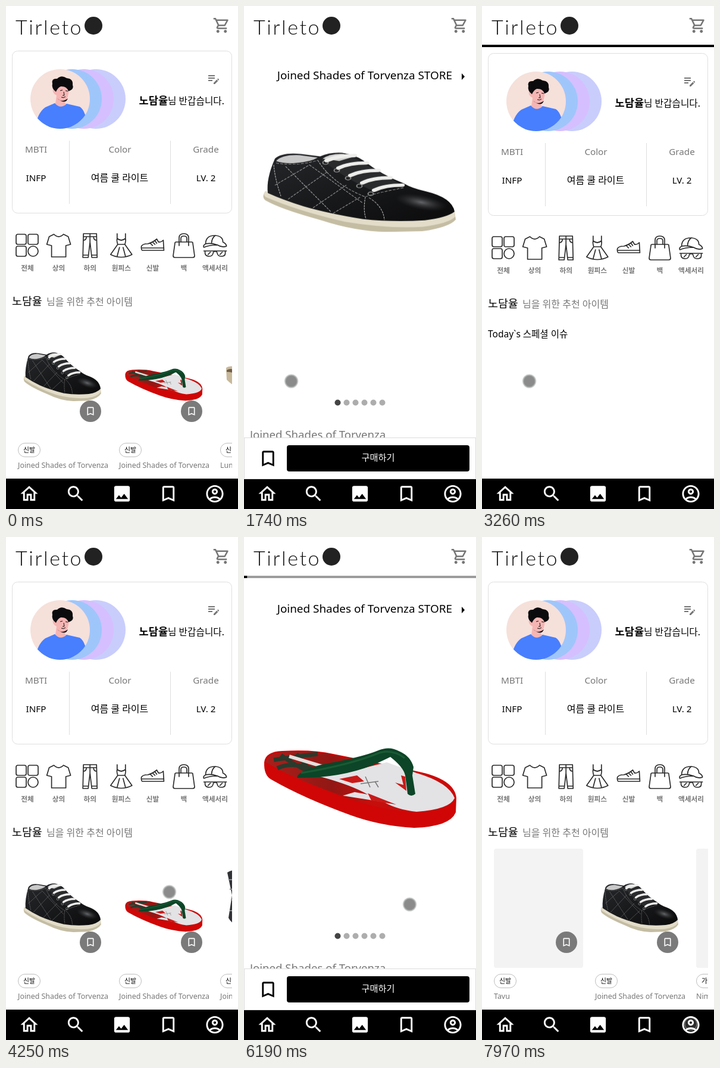
Animation, 390 px wide and 844 px high, one loop 8 s. Source, as an HTML page:

```html
<!DOCTYPE html>
<html lang="ko">
<head>
<meta charset="utf-8">
<title>Shop walkthrough</title>
<style>
html, body { margin: 0; width: 100%; height: 100%; overflow: hidden; background: #fff; }
svg { display: block; width: 390px; height: 844px; }
text { font-family: 'Noto Sans', 'Noto Sans CJK KR', 'Noto Sans CJK JP', 'Noto Sans CJK', sans-serif; }
.mid { text-anchor: middle; }
.gray { fill: #777; }
.line { fill: none; stroke: #2b2b2b; stroke-width: 1.7; stroke-linejoin: round; stroke-linecap: round; }

.shift, .bar, .page, .list, .shoe, .sandal { animation: 8s step-end infinite; }
.shift { animation-name: shift; }
.bar { animation-name: bar; }
.page { animation-name: page; }
.first { animation-name: first; }
.second { animation-name: second; }
.third { animation-name: third; }
.shoe { animation-name: early; }
.sandal { animation-name: late; }
.fill { animation: fill 8s linear infinite; }
.grow { transform-origin: 0 177px; animation: grow 8s cubic-bezier(.33, 1, .68, 1) infinite; }
.dot { animation: move 8s ease-in-out infinite; }

@keyframes shift {
  0%, 21.75%, 48.25%, 63%, 85.5%, 100% { transform: translateY(0); }
  15.1%, 32.3%, 58.95%, 77.3% { transform: translateY(4px); }
}
@keyframes bar {
  0%, 21.75%, 48.25%, 63%, 85.5%, 100% { visibility: hidden; }
  15.1%, 32.3%, 58.95%, 77.3% { visibility: visible; }
}
@keyframes fill {
  0%, 15.1% { transform: scaleX(0); }
  21.74% { transform: scaleX(1); }
  21.75%, 32.375% { transform: scaleX(0); }
  39%, 48.25% { transform: scaleX(1); }
  48.26%, 58.95% { transform: scaleX(0); }
  62.99% { transform: scaleX(.61); }
  63%, 77.3% { transform: scaleX(0); }
  83.9%, 100% { transform: scaleX(1); }
}
@keyframes page {
  0%, 36.875%, 81.25%, 100% { visibility: hidden; }
  21.75%, 63% { visibility: visible; }
}
@keyframes first { 0% { visibility: visible; } 15.1%, 100% { visibility: hidden; } }
@keyframes second { 0%, 58.95%, 100% { visibility: hidden; } 48.25% { visibility: visible; } }
@keyframes third { 0% { visibility: hidden; } 85.5%, 100% { visibility: visible; } }
@keyframes early { 0% { opacity: 1; } 50%, 100% { opacity: 0; } }
@keyframes late { 0% { opacity: 0; } 50%, 100% { opacity: 1; } }
@keyframes grow {
  0%, 21.75% { transform: scaleY(.65); }
  25%, 62.99% { transform: scaleY(1); }
  63% { transform: scaleY(.65); }
  66.5%, 100% { transform: scaleY(1); }
}
@keyframes move {
  0%, 5.8% { transform: translate(184px, 726px); opacity: 0; }
  5.87% { transform: translate(184px, 726px); opacity: 1; }
  12.6%, 48.25% { transform: translate(79.5px, 629.5px); }
  53.1% { transform: translate(274.5px, 595.5px); }
  58.1%, 88% { transform: translate(278.5px, 616.5px); }
  97% { opacity: 1; }
  98%, 100% { transform: translate(351px, 817px); opacity: .7; }
}
</style>
</head>
<body>
<svg viewBox="0 0 390 844" xmlns="http://www.w3.org/2000/svg">
<defs>
  <path id="mark" d="M17 3H7c-1.1 0-1.99.9-1.99 2L5 21l7-3 7 3V5c0-1.1-.9-2-2-2zm0 15-5-2.18L7 18V5h10v13z"/>
  <clipPath id="face"><circle cx="91" cy="156" r="50"/></clipPath>
  <clipPath id="row"><rect x="10" y="515" width="370" height="285"/></clipPath>
  <linearGradient id="leather" x1="0" y1="0" x2="1" y2="1">
    <stop offset="0" stop-color="#26272a"/><stop offset=".5" stop-color="#18191b"/><stop offset="1" stop-color="#0b0b0c"/>
  </linearGradient>
  <radialGradient id="sheen">
    <stop offset="0" stop-color="#777a7e" stop-opacity=".8"/><stop offset="1" stop-color="#333" stop-opacity="0"/>
  </radialGradient>
  <linearGradient id="bed">
    <stop offset="0" stop-color="#a8201c"/><stop offset=".35" stop-color="#921714"/><stop offset=".55" stop-color="#c50f0d"/>
  </linearGradient>

  <g id="shoe">
    <path fill="#c4bda3" d="M36 381Q29 396 36 405Q62 428 130 456Q186 484 240 486L300 484Q345 474 356 454L354 434Q300 462 230 458Q140 440 36 381Z"/>
    <path fill="#e2dcc8" d="M36 381Q31 390 36 396Q90 432 170 460Q240 478 300 473Q345 464 355 447L354 434Q300 460 230 456Q140 436 36 381Z"/>
    <path fill="url(#leather)" d="M52 298Q64 281 96 286L128 292Q145 281 165 283Q186 288 200 302Q232 340 268 361Q282 374 306 382Q350 398 354 434Q340 450 304 456Q250 461 200 453Q140 438 100 420Q66 404 40 386Q37 350 52 298Z"/>
    <ellipse cx="298" cy="410" rx="46" ry="19" transform="rotate(18 298 410)" fill="url(#sheen)"/>
    <ellipse cx="205" cy="350" rx="16" ry="50" transform="rotate(-35 170 350)" fill="url(#sheen)" opacity=".35"/>
    <path fill="#c9c9c9" d="M54 304Q64 287 94 289L124 295Q112 306 88 309Q68 312 54 304Z"/>
    <g fill="none" stroke="#b9b9b9" stroke-width="1.1" stroke-dasharray="5 2">
      <path d="M54 309Q90 318 124 302M50 314Q52 350 62 394M124 302Q148 362 204 396Q216 388 270 372M204 396Q200 430 205 452M210 398Q234 420 236 455M70 318L146 434M110 314L200 412M52 366L110 314M74 402L140 332M116 424L172 366M150 438L196 396"/>
    </g>
    <path fill="#2a2b2d" d="M130 300Q150 284 178 290L262 362L222 384Q170 350 130 300Z"/>
    <g id="eyes" fill="none" stroke="#8f8f8f" stroke-width="2"></g>
    <path fill="#d4d4d2" d="M132 298Q146 284 168 286L182 294L160 304Z"/>
    <g id="laces" fill="none" stroke="#eeeeec" stroke-width="8.500" stroke-linecap="round"></g>
  </g>

  <g id="sandal">
    <path fill="#cf0605" d="M34 374Q36 356 64 355Q116 352 150 360L230 376L290 389Q354 402 357 434L356 458Q346 482 286 484Q230 481 180 463Q100 434 46 403Q33 396 34 374Z"/>
    <path fill="url(#bed)" d="M37 374Q40 357 70 357Q120 354 150 362L290 391Q348 404 355 434Q342 458 286 458Q214 452 150 425Q80 400 37 374Z"/>
    <path fill="none" stroke="#2b3a2c" stroke-width="7" d="M50 370Q90 364 124 360M56 384Q80 372 118 386M88 360L108 384M62 362Q84 378 106 388"/>
    <path stroke="#e6dedb" stroke-width="6" d="M76 364L142 384"/>
    <path fill="#e3e2e5" d="M128 398L176 390L240 374L290 392Q344 408 354 434Q346 453 290 457Q256 453 236 441L166 430L186 424L208 428Q180 412 128 398Z"/>
    <path fill="#c91a18" d="M160 402L190 396L202 406L182 409ZM208 426L256 445L214 438ZM264 396L271 398L273 422L254 408L268 412Z"/>
    <path fill="none" stroke="#777" stroke-width="1.500" d="M196 410L226 406M204 398L212 416M220 406L226 416"/>
    <path fill="#0c4527" d="M89 400Q90 389 130 378Q200 365 226 354Q245 346 262 356Q280 364 285 382L283 396L288 427Q281 433 275 427L271 396Q268 382 246 365Q236 370 216 379Q160 401 89 400Z"/>
    <path fill="none" stroke="#1a5a34" stroke-width="3" d="M96 392Q180 378 228 358Q250 352 270 367"/>
  </g>
  <g id="boot"><path fill="#303236" d="M12 40Q20 34 40 36V135Q20 128 14 116L20 78Z"/><path stroke="#888" stroke-width="2" d="M14 52H40M16 68H40M18 86H40M16 104H40"/></g>
  <g id="beige"><path fill="#c8b89b" d="M10 84Q17 78 35 86V120Q18 112 11 104Z"/><path fill="#715e48" d="M11 88Q20 82 35 94V99Q20 90 11 91Z"/></g>
  <rect id="blank" width="150" height="200" rx="4" fill="#f3f3f3"/>
</defs>

<rect width="390" height="844" fill="#fff"/>

<g class="shift">
  <rect x="10.5" y="75.5" width="369" height="272" rx="9" fill="#fff" stroke="#dedede"/>
  <circle cx="151" cy="156" r="50" fill="#c9cdfc"/>
  <circle cx="131" cy="156" r="50" fill="#d5bfff"/>
  <circle cx="111" cy="156" r="50" fill="#9fc6fb"/>
  <g clip-path="url(#face)">
    <rect x="41" y="106" width="100" height="100" fill="#f6e0da"/>
    <path fill="#477fff" d="M49 206Q52 180 66 170L82 163Q92 170 102 164L124 169Q135 176 137 206Z"/>
    <path fill="#f5b5b3" d="M82 130L106 134Q106 156 98 160L101 165Q91 173 83 164L85 150Q77 146 79 139Z"/>
    <path fill="#0b0b0d" d="M84 144Q76 138 78 130Q76 121 86 122Q93 115 102 121Q113 122 112 132Q115 140 105 143Q102 134 92 135Q87 137 84 144ZM86 155Q94 163 104 155Q100 166 86 155Z"/>
    <path fill="none" stroke="#111" d="M91 142l4-1M100 142l4 1M97 144l1 6l-3 0M93 153q4 2 7-1"/>
  </g>
  <path transform="translate(337 110)" fill="#757575" d="M3 10h11v2H3v-2zm0-2h11V6H3v2zm0 8h7v-2H3v2zm15.01-3.13.71-.71c.39-.39 1.02-.39 1.41 0l.71.71c.39.39.39 1.02 0 1.41l-.71.71-2.12-2.12zm-.71.71-5.3 5.3V21h2.12l5.3-5.3-2.12-2.12z"/>
  <text x="367" y="165" text-anchor="end" font-size="15.7"><tspan font-size="17.6" font-weight="700">노담율</tspan>님 반갑습니다.</text>
  <g class="mid" font-size="15.2">
    <g class="gray"><text x="50.5" y="246">MBTI</text><text x="191.5" y="246">Color</text><text x="336" y="246">Grade</text></g>
    <text x="50.5" y="294">INFP</text><text x="191" y="294" font-size="16">여름 쿨 라이트</text><text x="336" y="294">LV. 2</text>
  </g>
  <path d="M106.5 226V332M276.5 226V332" stroke="#dedede"/>
  <g id="cats"></g>
  <text x="10" y="502" font-size="18.4" font-weight="500">노담율</text>
  <text x="68" y="502" font-size="16" class="gray">님을 위한 추천 아이템</text>
  <text x="10" y="552" font-size="15.5">Today`s 스페셜 이슈</text>
  <g id="lists" clip-path="url(#row)"></g>
</g>

<g class="page">
  <rect y="65" width="390" height="729" fill="#fff"/>
  <g class="shift">
    <text x="350" y="123" text-anchor="end" font-size="18.9">Joined Shades of Torvenza STORE</text>
    <path d="M366 113L371 118.500L366 124Z"/>
    <g class="grow">
      <use href="#shoe" class="shoe"/>
      <use href="#sandal" class="sandal"/>
    </g>
    <g id="pager"></g>
    <text x="10" y="726" font-size="18.6" class="gray">Joined Shades of Torvenza</text>
  </g>
</g>

<rect y="793" width="390" height="51"/>
<g class="page">
  <rect x=".5" y="724.500" width="389" height="69" fill="#fff" stroke="#dcdcdc"/>
  <use href="#mark" transform="translate(23 742) scale(1.458)"/>
  <rect x="72" y="737" width="307" height="44" rx="4"/>
  <text x="225.5" y="763" font-size="15.2" fill="#fff" class="mid">구매하기</text>
</g>

<g class="bar">
  <rect y="65" width="390" height="4" fill="#9c9c9c"/>
  <rect y="65" width="390" height="4" class="fill"/>
</g>

<text x="16" y="48" style="font:300 34px Lato,sans-serif;letter-spacing:2.6px" fill="#111">Tirleto</text>
<circle cx="147" cy="33" r="15" fill="#222"/>
<path transform="translate(347.5 17.5) scale(1.25)" fill="#757575" d="M15.55 13c.75 0 1.41-.41 1.75-1.03l3.58-6.49c.37-.66-.11-1.48-.87-1.48H5.21l-.94-2H1v2h2l3.6 7.59-1.35 2.44C4.52 15.37 5.48 17 7 17h12v-2H7l1.1-2h7.45zM6.16 6h12.15l-2.76 5H8.53L6.16 6zM7 18c-1.1 0-1.99.9-1.99 2S5.9 22 7 22s2-.9 2-2-.9-2-2-2zm10 0c-1.1 0-1.99.9-1.99 2s.89 2 1.99 2 2-.9 2-2-.9-2-2-2z"/>

<circle class="dot" r="10.500" fill="#5a5a5a" fill-opacity=".7" stroke="#b4bab6" stroke-opacity=".8" stroke-width="2"/>

<g fill="#fff">
  <path transform="translate(21.5 801) scale(1.458)" d="M12 5.69l5 4.5V18h-2v-6H9v6H7v-7.81l5-4.5M12 3L2 12h3v8h6v-6h2v6h6v-8h3L12 3z"/>
  <path transform="translate(99.5 801) scale(1.458)" d="M15.5 14h-.79l-.28-.27C15.41 12.59 16 11.11 16 9.5 16 5.91 13.09 3 9.5 3S3 5.91 3 9.5 5.91 16 9.5 16c1.61 0 3.09-.59 4.23-1.57l.27.28v.79l5 4.99L20.49 19l-4.99-5zm-6 0C7.01 14 5 11.99 5 9.5S7.01 5 9.5 5 14 7.01 14 9.5 11.99 14 9.5 14z"/>
  <path transform="translate(177.5 801) scale(1.458)" d="M21 19V5c0-1.1-.9-2-2-2H5c-1.1 0-2 .9-2 2v14c0 1.1.9 2 2 2h14c1.1 0 2-.9 2-2zM8.5 13.5l2.5 3.01L14.5 12l4.5 6H5l3.5-4.5z"/>
  <use href="#mark" transform="translate(255.5 801) scale(1.458)"/>
  <path transform="translate(333.5 801) scale(1.458)" d="M12 2C6.48 2 2 6.48 2 12s4.48 10 10 10 10-4.48 10-10S17.52 2 12 2zM7.35 18.5C8.66 17.56 10.26 17 12 17s3.34.56 4.65 1.5C15.34 19.44 13.74 20 12 20s-3.34-.56-4.65-1.5zm10.79-1.38C16.45 15.8 14.32 15 12 15s-4.45.8-6.14 2.12C4.7 15.73 4 13.95 4 12c0-4.42 3.58-8 8-8s8 3.58 8 8c0 1.95-.7 3.73-1.86 5.12zM12 6c-1.93 0-3.5 1.57-3.5 3.5S10.07 13 12 13s3.5-1.57 3.5-3.5S13.93 6 12 6zm0 5c-.83 0-1.5-.67-1.5-1.5S11.17 8 12 8s1.5.67 1.5 1.5S12.83 11 12 11z"/>
</g>
</svg>
<script>
const put = (id, html) => { document.getElementById(id).innerHTML = html; };
const repeat = (n, fn) => Array.from({ length: n }, (_, i) => fn(i)).join('');

put('eyes', repeat(5, i => `<circle cx="${137 + 19 * i}" cy="${308 + 20 * i}" r="4.500"/>`));
put('laces', repeat(5, i => `<path d="M${139 + 20 * i} ${303 + 19 * i}q18 -13 47 -13"/>`));
put('pager', repeat(6, i => `<circle cx="${157.5 + 15 * i}" cy="665.5" r="5" fill="${i ? '#adadad' : '#444'}"/>`));

const cats = [
  ['전체', 'M-16-19h11q3 0 3 3v11q0 3-3 3h-11q-3 0-3-3v-11q0-3 3-3zM4-19h11q3 0 3 3v11q0 3-3 3h-11q-3 0-3-3v-11q0-3 3-3zM-16 1h11q3 0 3 3v11q0 3-3 3h-11q-3 0-3-3v-11q0-3 3-3zM1 9.500a8.500 8.500 0 1 0 17 0a8.500 8.500 0 1 0-17 0'],
  ['상의', 'M-8-19Q0-11 8-19L16-15L20-2L12 0V19H-12V0L-20-2L-16-15Z'],
  ['하의', 'M-11-20H11L12 20H3L0-6L-3 20H-12ZM-11-15H11M0-20V-6M-11-9q5 0 5-6M11-9q-5 0-5-6M-12 16h9M12 16h-9'],
  ['원피스', 'M-7-20V-12Q-8-8-6-2L-18 15Q0 24 18 15L6-2Q8-8 7-12V-20M-7-12Q0-6 7-12M-6-2H6M-3 3L-7 18M3 3L7 18'],
  ['신발', 'M-19 2Q-18-3-8-3Q0-5 7-11L10-6Q14-5 18-9L19 8H-17Q-19 8-19 2ZM-19 4H19M-4-4l4 4M0-6l4 4M4-8l3 4'],
  ['백', 'M-13-6H13Q15-6 15-4L18 17Q18 20 15 20H-15Q-18 20-18 17L-15-4Q-15-6-13-6ZM-8 0V-13Q-8-20 0-20Q8-20 8-13V0M-5-6V-12Q-5-16 0-16Q5-16 5-12V-6'],
  ['액세서리', 'M-16-3Q-16-17 0-17Q13-16 13-6Q19-3 19 1Q12 4 4-1Q-6-5-16-3Q-21 0-19 3Q-10-1 4-1M0-17Q-6-12-6-4M-19 9H19M-17 9V13Q-16 18-10 18Q-4 18-3 11Q0 8 3 11Q4 18 10 18Q17 18 17 13V9M-12 15l4-4M8 15l4-4']
];
put('cats', cats.map(([name, d], i) => {
  const x = 36 + 52.6 * i;
  return `<path class="line" transform="translate(${x} 402)" d="${d}"/>
    <text class="mid gray" x="${x}" y="443.500" font-size="11.7" font-weight="700">${name}</text>`;
}).join(''));

const brand = 'Joined Shades of Torvenza';
const big = { shoe: 1, sandal: 1 };
const item = ([pic, label, chip = '신발'], i) => `<g transform="translate(${20 + 170 * i} 523)">
  <use href="#${pic}" ${big[pic] ? 'transform="translate(-3.3 -55.3) scale(.402)"' : ''}/>
  <circle cx="122" cy="157" r="18" fill="#7a7a7a"/>
  <use href="#mark" fill="#fff" transform="translate(112.5 147.5) scale(.79)"/>
  <rect x=".5" y="210.500" width="37" height="23" rx="11.500" fill="#fff" stroke="#bdbdbd"/>
  <text class="mid" x="19" y="225.500" font-size="10.800">${chip}</text>
  <text class="gray" y="251.500" font-size="12.4">${label}</text></g>`;
// The white backing pushes the next section out of sight
const list = (name, items) => `<g class="list ${name}">
  <rect x="10" y="515" width="370" height="285" fill="#fff"/>${items.map(item).join('')}</g>`;
put('lists',
  list('first', [['shoe', brand], ['sandal', brand], ['beige', 'Lumeq']]) +
  list('second', [['shoe', brand], ['sandal', brand], ['boot', brand]]) +
  list('third', [['blank', 'Tavu'], ['shoe', brand], ['blank', 'Nimrel', '가방']]));
</script>
</body>
</html>
```
